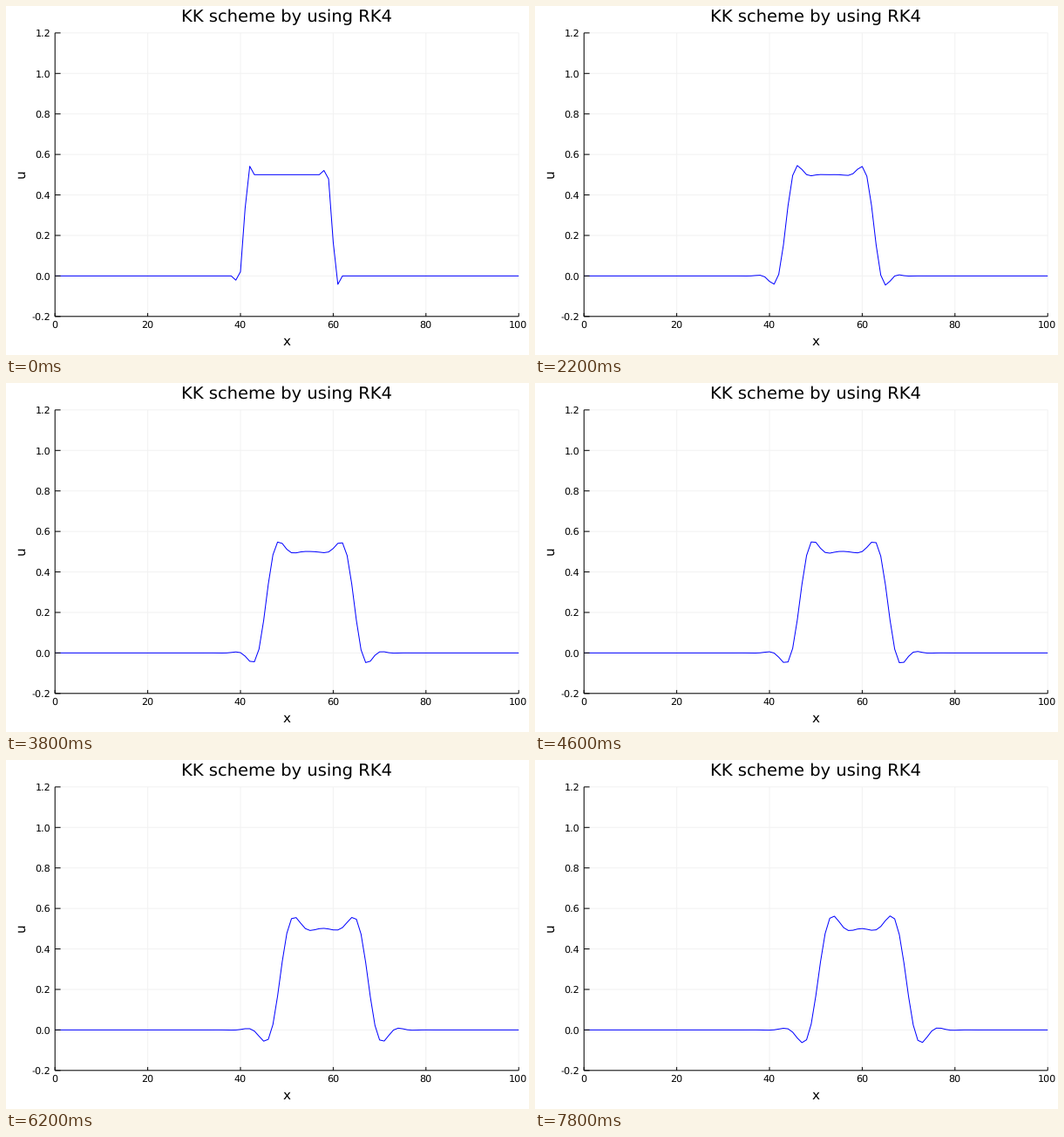
A matplotlib script that plays this animation: 600 by 400 pixels, repeating every 8 s.

```python
import numpy as np
import matplotlib.pyplot as plt
from matplotlib.animation import FuncAnimation

W, H, DPI = 600, 400, 100
FRAMES, INTERVAL = 40, 200
LEFT, RIGHT, TOP, BOTTOM = 56.2, 588.19, 30.87, 355.8
X_TICK, Y_TICK = 0.012 * (BOTTOM - TOP), 0.012 * (RIGHT - LEFT)
COURANT = 0.25

plt.rcParams["font.family"] = "DejaVu Sans"
plt.rcParams["text.hinting"] = "none"


def px(x):
    return LEFT + (RIGHT - LEFT) * np.asarray(x) / 100


def py(u):
    return BOTTOM - (BOTTOM - TOP) * (np.asarray(u) + 0.2) / 1.4


def advance(u):
    """One explicit step of upwind-damped fourth-order advection."""
    l2, l1, r1, r2 = (np.roll(u, k) for k in (2, 1, -1, -2))
    slope = (l2 - 8 * l1 + 8 * r1 - r2) / 12
    damping = (l2 - 4 * l1 + 6 * u - 4 * r1 + r2) / 4
    return u - COURANT * (slope + damping)


def solve():
    u = np.where((x > 40) & (x < 60), 0.5, 0.0)
    states = []
    for _ in range(FRAMES):
        u = advance(u)
        states.append(u)
    return states


x = np.arange(101)
states = solve()

fig = plt.figure(figsize=(W / DPI, H / DPI), dpi=DPI, facecolor="white")
ax = fig.add_axes([0, 0, 1, 1])
ax.set_xlim(0, W)
ax.set_ylim(H, 0)
ax.axis("off")


def stroke(xs, ys, color="black", z=3):
    return ax.plot(xs, ys, color=color, lw=0.72, zorder=z, snap=False,
                   solid_capstyle="butt", solid_joinstyle="round")[0]


def grid(xs, ys):
    stroke(xs, ys, "#f2f2f2", 1)


def label(lx, ly, s, size, ha="center"):
    ax.text(lx, ly, s, fontsize=size, ha=ha, va="baseline")


for v in range(0, 101, 20):
    p = px(v)
    grid([p, p], [TOP, BOTTOM])
    stroke([p, p], [BOTTOM, BOTTOM - X_TICK])
    label(p - 0.5, 369.2, str(v), 8)

for k in range(-1, 7):
    v = k / 5
    p = py(v)
    grid([LEFT, RIGHT], [p, p])
    stroke([LEFT, LEFT + Y_TICK], [p, p])
    label(51.3, p + 4.2, f"{v:.1f}", 8, ha="right")

stroke([LEFT, LEFT], [TOP, BOTTOM])
stroke([LEFT, RIGHT], [BOTTOM, BOTTOM])

label(322, 18.4, "KK scheme by using RK4", 14)
label(322, 389, "x", 11)
ax.text(24.8, 192.3, "u", fontsize=11, rotation=90, ha="right", va="center")

curve = stroke(px(x), py(states[0]), "blue", 2)


def draw(i):
    curve.set_ydata(py(states[i]))
    return (curve,)


anim = FuncAnimation(fig, draw, frames=FRAMES, interval=INTERVAL,
                     init_func=lambda: draw(0), repeat=True, repeat_delay=0)
plt.show()
```
